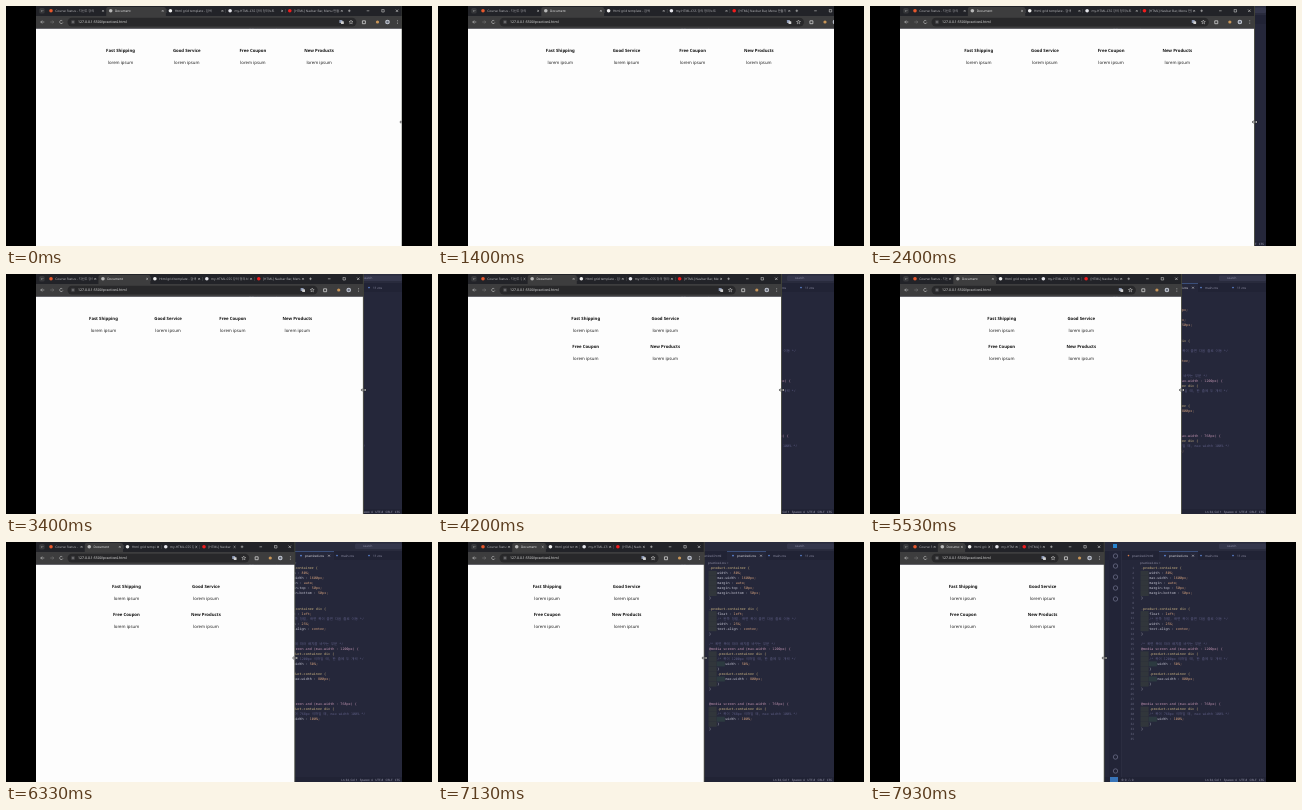
An HTML page with a canvas that plays this animation: 426x240 px, repeating every 8 s.

```html
<!DOCTYPE html>
<html lang="en">
<head>
<meta charset="utf-8">
<title>Responsive product grid</title>
<style>
  html, body { margin: 0; width: 100%; height: 100%; overflow: hidden; background: #000; }
  canvas { display: block; width: 426px; height: 240px; }
</style>
</head>
<body>
<canvas id="stage"></canvas>
<script>
const canvas = document.getElementById('stage');
const ctx = canvas.getContext('2d');
const W = 426, H = 240, LOOP = 8000, STEP = 1000 / 15;
const LEFT = 30, SCREEN_RIGHT = 396;
const SANS = '"Noto Sans", "Noto Sans CJK KR", "Noto Sans CJK", sans-serif';
const MONO = '"Noto Sans Mono", "Noto Sans CJK KR", "Noto Sans CJK", monospace';
const CHAR = 2.05, INDENT = 4 * CHAR, CODE_X = 271;

const ratio = Math.max(1, window.devicePixelRatio || 1);
canvas.width = W * ratio;
canvas.height = H * ratio;
ctx.textRendering = 'geometricPrecision';

// Time in ms and x of the dragged window edge
const EDGE = [[0, 396], [1400, 411.5], [3400, 357.2], [4200, 343.3],
              [5530, 311.5], [7130, 266.2], [7930, 234.2], [8000, 231.5]];

const TABS = [
  ['Course Status - 지난주 강의', '#e8582c'],
  ['Document', '#b8b8b8'],
  ['Html grid template - 검색', '#f0f0f0'],
  ['my-HTML-CSS 강의 정리노트', '#e4e4ea'],
  ['[HTML] Navbar Bar, Menu 만들기', '#f01c1c']
];

const PRODUCTS = ['Fast Shipping', 'Good Service', 'Free Coupon', 'New Products'];

const CODE = `.product-container {
    width : 80%;
    max-width : 1600px;
    margin : auto;
    margin-top : 50px;
    margin-bottom : 50px;
}

.product-container div {
    float : left;
    /* 왼쪽 정렬, 화면 폭이 줄면 다음 줄로 이동 */
    width : 25%;
    text-align : center;
}

/* 화면 폭에 따라 배치를 바꾸는 부분 */
@media screen and (max-width : 1200px) {
    .product-container div {
    /* 폭이 1200px 이하일 때, 한 줄에 두 개씩 */
        width : 50%;
    }
    .product-container {
        max-width : 800px;
    }
}


@media screen and (max-width : 768px) {
    .product-container div {
    /* 폭이 768px 이하일 때, max width 100% */
        width : 100%;
    }
}

`.split('\n');

function rect(x, y, w, h, color) {
  ctx.fillStyle = color;
  ctx.fillRect(x, y, w, h);
}

function pill(x, y, w, h, r, color) {
  ctx.fillStyle = color;
  ctx.beginPath();
  ctx.roundRect(x, y, w, h, r);
  ctx.fill();
}

function dot(x, y, r, color) {
  ctx.fillStyle = color;
  ctx.beginPath();
  ctx.arc(x, y, r, 0, Math.PI * 2);
  ctx.fill();
}

// Polyline from a flat list of offsets around (x, y)
function stroke(x, y, points, color = '#c4c4c4', width = 0.6) {
  ctx.strokeStyle = color;
  ctx.lineWidth = width;
  ctx.beginPath();
  for (let i = 0; i < points.length; i += 2) {
    ctx.lineTo(x + points[i], y + points[i + 1]);
  }
  ctx.stroke();
}

function cross(x, y, s, color) {
  stroke(x, y, [-s, -s, s, s], color);
  stroke(x, y, [-s, s, s, -s], color);
}

function text(str, x, y, size, color, { font = SANS, weight = 400, align = 'left' } = {}) {
  ctx.font = `${weight} ${size}px ${font}`;
  ctx.textAlign = align;
  ctx.textBaseline = 'middle';
  ctx.fillStyle = color;
  ctx.fillText(str, x, y);
}

function clipped(x, y, w, h, draw) {
  ctx.save();
  ctx.beginPath();
  ctx.rect(x, y, w, h);
  ctx.clip();
  draw();
  ctx.restore();
}

function edgeAt(t) {
  const i = Math.max(1, EDGE.findIndex(([time]) => time >= t));
  const [t0, x0] = EDGE[i - 1], [t1, x1] = EDGE[i];
  return x0 + (x1 - x0) * (t - t0) / (t1 - t0);
}

function codeColor(line) {
  const s = line.trim();
  if (s.startsWith('/*')) return '#5d5d84';
  if (s.startsWith('@')) return '#c596b4';
  if (s.startsWith('.')) return '#cdb583';
  return '#c3c3d0';
}

function drawCode() {
  CODE.forEach((line, i) => {
    const y = 26.3 + i * 5.03;
    text(String(i + 1), 264, y, 3, '#6c6e86', { font: MONO, align: 'right' });
    const indent = line.length - line.trimStart().length;
    if (indent) rect(CODE_X - 0.5, y - 2.5, INDENT, 5.03, '#31363b');
    if (indent > 4) rect(CODE_X - 0.5 + INDENT, y - 2.5, INDENT, 5.03, '#2c3a40');
    const x = CODE_X + indent * CHAR;
    const [name, value] = line.trim().split(/(?<=^[a-z-]+ :) /);
    text(name, x, y, 3.42, codeColor(line), { font: MONO });
    if (value) text(value, x + (name.length + 1) * CHAR, y, 3.42, '#d7a27e', { font: MONO });
  });
}

function drawEditor() {
  rect(LEFT, 0, SCREEN_RIGHT - LEFT, H, '#25273a');
  rect(LEFT, 0, SCREEN_RIGHT - LEFT, 9, '#292b3d');
  rect(LEFT, 9, SCREEN_RIGHT - LEFT, 9, '#212335');
  rect(239, 9, 12.5, 226, '#222437');
  rect(251.3, 9, 0.4, 226, '#383a50');

  rect(243, 2, 4, 4, '#2784cf');
  pill(349, 1.5, 47, 5.5, 1.5, '#34364b');
  text('search', 357, 4.3, 3, '#8b8ca5');

  for (const y of [14, 24, 35, 46, 57, 215, 229]) {
    ctx.strokeStyle = '#72748e';
    ctx.lineWidth = 0.7;
    ctx.beginPath();
    ctx.arc(245.5, y, 2.2, 0, Math.PI * 2);
    ctx.stroke();
  }

  rect(289, 9, 39, 9, '#25273a');
  rect(289, 9, 39, 0.5, '#4f74b8');
  text('practice4.html', 262, 13.7, 3.2, '#9292a8');
  dot(258.5, 13.6, 0.8, '#d07a4c');
  text('practice4.css', 299, 13.7, 3.2, '#e0e0e8');
  dot(295, 13.6, 0.9, '#6088d8');
  cross(323, 13.7, 0.9, '#c8c8d0');
  text('main.css', 335, 13.7, 3.2, '#9292a8');
  dot(331, 13.6, 0.8, '#6088d8');
  text('11.css', 367, 13.7, 3.2, '#9292a8');
  dot(363, 13.6, 0.8, '#6088d8');
  text('practice4.css >', 270, 20.8, 3, '#9292a8');

  drawCode();

  rect(LEFT, 235, SCREEN_RIGHT - LEFT, 5, '#212335');
  rect(240, 235, 8, 5, '#3874b8');
  text('⊗ 0  △ 0', 251, 237.8, 3, '#a4a4b8');
  text('Ln 34, Col 1   Spaces: 4   UTF-8   CRLF   CSS', 394, 237.8, 3, '#a4a4b8', { align: 'right' });
}

function drawTabs(right) {
  const pitch = (right - LEFT - 67.5) / TABS.length;
  rect(LEFT, 0, right - LEFT, 10, '#222328');
  pill(33.2, 2, 5.5, 5.5, 1.5, '#36373a');
  stroke(36, 4.8, [-1.1, -0.5, 0, 0.6, 1.1, -0.5]);

  TABS.forEach(([title, color], i) => {
    const x = 41.3 + i * pitch;
    const active = i === 1;
    if (active) pill(x - 0.8, 1, pitch, 9, [2, 2, 0, 0], '#3d3d3e');
    else if (i > 1) rect(x - 0.8, 3, 0.4, 4, '#55565a');
    dot(x + 3.7, 4.8, 1.8, color);
    clipped(x + 7.5, 0, Math.max(0, pitch - 14), 10, () => {
      text(title, x + 8, 5.1, 3.2, active ? '#e6e6e6' : '#b4b4b8');
    });
    cross(x + pitch - 4, 4.9, 0.9, '#bababa');
  });

  const plus = 41.3 + TABS.length * pitch + 3.5;
  stroke(plus, 4.8, [-1.3, 0, 1.3, 0]);
  stroke(plus, 4.8, [0, -1.3, 0, 1.3]);
  stroke(right - 34, 4.8, [-1.3, 0, 1.3, 0]);
  stroke(right - 19, 4.8, [-1.2, -1.2, 1.2, -1.2, 1.2, 1.2, -1.2, 1.2, -1.2, -1.5]);
  cross(right - 5, 4.8, 1.2, '#d4d4d4');
}

function drawToolbar(right) {
  const y = 16;
  rect(LEFT, 10, right - LEFT, 12.5, '#3d3d3e');
  stroke(36.5, y, [1.8, 0, -1.8, 0, -0.3, -1.5]);
  stroke(36.5, y, [-1.8, 0, -0.3, 1.5]);
  stroke(46, y, [-1.8, 0, 1.8, 0, 0.3, -1.5], '#777');
  stroke(46, y, [1.8, 0, 0.3, 1.5], '#777');
  ctx.strokeStyle = '#c4c4c4';
  ctx.beginPath();
  ctx.arc(55.3, y, 1.6, 0.3, 5.4);
  ctx.stroke();

  pill(61.5, 11.7, right - 45.5 - 61.5, 8.8, 4.4, '#28282a');
  dot(67, y, 2.2, '#414144');
  stroke(67, y, [-0.9, 0, 0.9, 0], '#d0d0d0');
  text('127.0.0.1:5500/practice4.html', 72, y + 0.2, 3.5, '#dedede');

  pill(right - 62.6, y - 1.9, 3, 3, 0.5, '#8c98b4');
  pill(right - 61, y - 0.7, 2.8, 2.8, 0.5, '#d0d0d0');
  stroke(right - 51, y, [0, -2, 0.6, -0.6, 2, -0.5, 0.9, 0.4, 1.2, 1.8, 0, 1,
    -1.2, 1.8, -0.9, 0.4, -2, -0.5, -0.6, -0.6, 0, -2], '#d0d0d0', 0.5);
  stroke(right - 38, y, [-1.6, -1.2, 1.4, -1.2, 1.4, 1.7, -1.6, 1.7, -1.6, -1.2], '#d0d0d0', 0.8);
  dot(right - 24.5, y, 1.6, '#c99658');
  dot(right - 14.5, y, 2.3, '#c1c6d1');
  dot(right - 14.5, y, 1.2, '#686d79');
  for (const d of [-1.5, 0, 1.5]) dot(right - 4.5, y + d, 0.4, '#d0d0d0');
}

function drawPage(right) {
  const width = right - LEFT;
  const center = (LEFT + right) / 2 + 0.8;
  const cols = right < 350 ? 2 : 4;
  const cell = cols === 2 ? 79.5 : Math.min(66.2, width * 0.79 / 4);
  rect(LEFT, 22.5, width, H - 22.5, '#fdfdfd');
  PRODUCTS.forEach((name, i) => {
    const x = center + (i % cols - (cols - 1) / 2) * cell;
    const y = 44.7 + Math.floor(i / cols) * 28;
    text(name, x, y, 4.3, '#111', { weight: 700, align: 'center' });
    text('lorem ipsum', x, y + 12.1, 4.3, '#222', { align: 'center' });
  });
}

function drawCursor(x, y) {
  for (const [color, width] of [['#111', 1.2], ['#f4f4f4', 0.6]]) {
    stroke(x, y, [-2, 0, 2, 0], color, width);
    stroke(x, y, [-1.1, -1, -2.1, 0, -1.1, 1], color, width);
    stroke(x, y, [1.1, -1, 2.1, 0, 1.1, 1], color, width);
  }
}

function draw(t) {
  const right = edgeAt(t);
  ctx.setTransform(ratio, 0, 0, ratio, 0, 0);
  rect(0, 0, W, H, '#000');
  clipped(LEFT, 0, SCREEN_RIGHT - LEFT, H, () => {
    drawEditor();
    drawPage(right);
    drawTabs(right);
    drawToolbar(right);
    rect(right - 0.3, 0, 0.8, H, '#45463a');
    drawCursor(right + 0.5, 116);
  });
}

function tick() {
  const t = performance.now() % LOOP;
  draw(Math.floor((t + 4) / STEP) * STEP % LOOP);
  requestAnimationFrame(tick);
}
tick();
</script>
</body>
</html>
```
